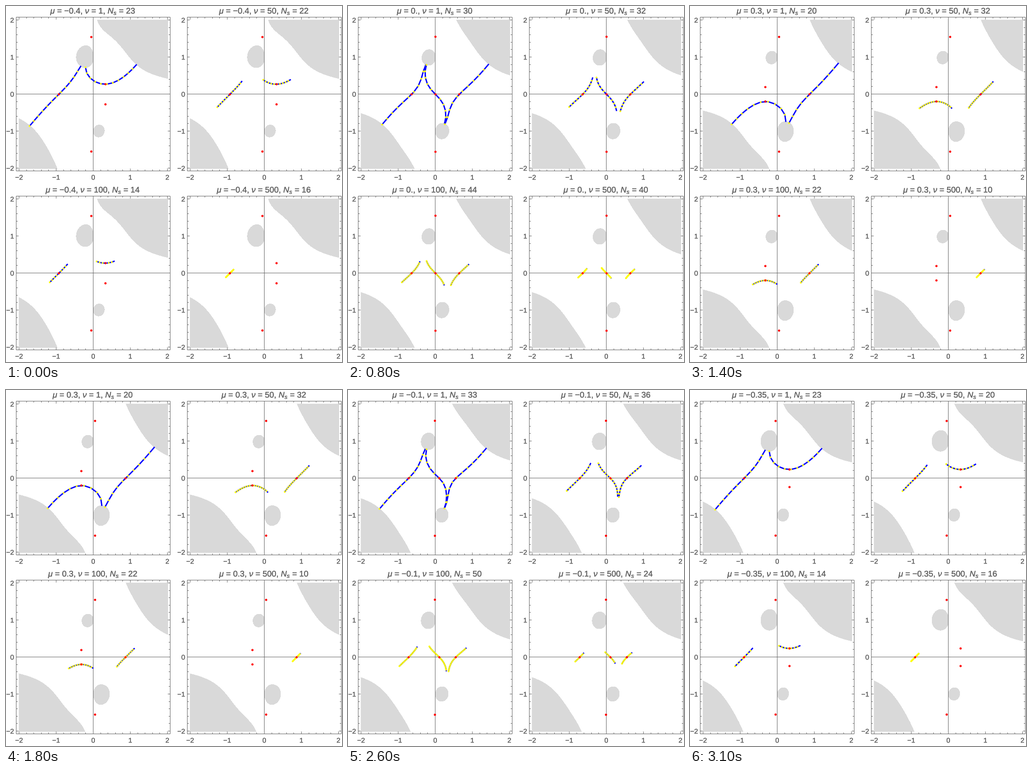
A matplotlib script that plays this animation: 707 px wide and 750 px high, repeating every 3200 ms.

```python
import numpy as np
import matplotlib.pyplot as plt
from matplotlib import patheffects
from matplotlib.animation import FuncAnimation
from matplotlib.collections import LineCollection

# Thimbles of the phase (x - mu)^2 + 2 / (1 + x^2) at four frequencies nu.
W, H, DPI = 707, 750, 64
PT = 72 / DPI            # points per pixel
UNIT = 78                # pixels per axis unit
HALF = 162               # half the side of a panel frame
CUT = 1.93               # height above which the plane is shaded
DECAY = 17               # nu * height at which a thimble is cut off
FAINT = 10               # nu * height at which a saddle no longer counts
MERGE = 0.15             # closer saddles share one uncut curve
INK = "#666666"
CENTRES = ((183.5, 185.5), (543.5, 185.5), (183.5, 562.5), (543.5, 562.5))

# Number of segments for |mu| = 0, 0.05, ... 0.4
COUNTS = {
    1: (30, 32, 33, 28, 22, 21, 20, 23, 23),
    50: (32, 34, 36, 30, 24, 28, 32, 20, 22),
    100: (44, 47, 50, 34, 18, 20, 22, 14, 14),
    500: (40, 32, 24, 31, 38, 24, 10, 16, 16),
}

plt.rcParams.update({
    "font.family": "Liberation Sans",
    "mathtext.fontset": "custom",
    "mathtext.rm": "Liberation Sans",
    "mathtext.it": "Liberation Sans:italic",
})


def height(z, mu):
    return ((z - mu) ** 2 + 2 / (1 + z * z)).imag


def slope(z, mu):
    return 2 * (z - mu) - 4 * z / (1 + z * z) ** 2


def curvature(z):
    return 2 - 4 * (1 - 3 * z * z) / (1 + z * z) ** 3


def saddles(mu):
    return np.roots([1, -mu, 2, -2 * mu, -1, -mu])


def climb(z, mu):
    d = 1j * np.conj(slope(z, mu))
    return d / abs(d)


def branch(z0, mu, side, limit):
    """Steepest ascent from a saddle up to a height, one pixel per step."""
    d = np.exp(0.5j * (np.pi / 2 - np.angle(curvature(z0))))
    d *= side * np.sign(d.real)
    step = 1 / UNIT
    path = [z0, z0 + d * step]
    while height(path[-1], mu) < limit and len(path) < 150:
        z = path[-1]
        mid = z + climb(z, mu) * step / 2
        path.append(z + climb(mid, mu) * step)
    return path


def resample(path, n):
    arc = np.append(0, np.cumsum(abs(np.diff(path))))
    s = np.linspace(0, arc[-1], n + 1)
    return np.interp(s, arc, path.real) + 1j * np.interp(s, arc, path.imag)


def contours(mu, nu, total):
    """Segmented curves of one panel, from left to right."""
    limit = min(CUT, DECAY / nu)
    found = [z for z in saddles(mu)
             if abs(z.imag) < 1 and -1e-6 < height(z, mu) * nu < FAINT]
    found.sort(key=lambda z: z.real)
    chains = []
    for i, z in enumerate(found):
        after = i > 0 and abs(z - found[i - 1]) < MERGE
        before = i + 1 < len(found) and abs(found[i + 1] - z) < MERGE
        if after:
            chains[-1].append(z)
        else:
            chains.append(branch(z, mu, -1, limit)[::-1])
        if not before:
            chains[-1] += branch(z, mu, 1, limit)[1:]

    chains = [np.array(c) for c in chains]
    lengths = np.cumsum([abs(np.diff(c)).sum() for c in chains])
    marks = np.round(lengths / lengths[-1] * total).astype(int)
    return [resample(c, n) for c, n in zip(chains, np.diff(marks, prepend=0))]


fig = plt.figure(figsize=(W / DPI, H / DPI), dpi=DPI, facecolor="white")
ax = fig.add_axes([0, 0, 1, 1])
ax.set_xlim(0, W)
ax.set_ylim(H, 0)
ax.axis("off")


def label(x, y, text, size, align="center"):
    heavier = [patheffects.withStroke(linewidth=0.35 * PT, foreground=INK)]
    return ax.text(x, y, text, size=size * PT, color=INK, ha=align,
                   va="baseline", path_effects=heavier)


def signed(text):
    return text.replace("-", "\u2212")


def draw_frame(cx, cy):
    lines = [[(cx - HALF, cy), (cx + HALF, cy)], [(cx, cy - HALF), (cx, cy + HALF)]]
    for e in (-1, 1):
        lines.append([(cx - HALF, cy + e * HALF), (cx + HALF, cy + e * HALF)])
        lines.append([(cx + e * HALF, cy - HALF), (cx + e * HALF, cy + HALF)])
        for i in range(-10, 11):
            p, edge = round(i * UNIT / 5), e * HALF
            inner = edge - e * (5 if i % 5 == 0 else 3)
            lines.append([(cx + p, cy + edge), (cx + p, cy + inner)])
            lines.append([(cx + edge, cy + p), (cx + inner, cy + p)])
    ax.add_collection(LineCollection(lines, colors=INK, linewidths=PT,
                                     snap=False, zorder=2))
    for i in range(-2, 3):
        text = signed(str(i))
        label(cx + i * UNIT, cy + HALF + 18.5, text, 14.5)
        label(cx - HALF - 4.5, cy - i * UNIT + 5.5, text, 14.5, "right")


for centre in CENTRES:
    draw_frame(*centre)

titles = [label(cx - 0.5, cy - 169.5, "", 17.3) for cx, cy in CENTRES]
grid = np.linspace(-2.01, 2.01, 400)
plane = grid[None, :] + 1j * grid[:, None]
live = []


def to_px(z, centre):
    return centre[0] + 0.5 + UNIT * z.real, centre[1] + 0.5 - UNIT * z.imag


def dots(x, y, color, size, order):
    """Round dots at sub-pixel places."""
    stubs = [[(a - 0.01, b), (a + 0.01, b)] for a, b in zip(x, y)]
    live.append(ax.add_collection(LineCollection(
        stubs, colors=color, linewidths=size * PT, capstyle="round",
        snap=False, zorder=order)))


def draw(i):
    while live:
        live.pop().remove()
    step = 8 - abs(i - 16)
    mu = step / 20
    name = signed(f"{mu:g}") if mu else "0."
    field = np.clip(height(plane, mu), -8, 8)
    for nu, centre, title in zip(COUNTS, CENTRES, titles):
        total = COUNTS[nu][abs(step)]
        x, y = to_px(plane, centre)
        live.append(ax.contourf(x, y, field, levels=[CUT, 100],
                                colors=["#d9d9d9"], zorder=1))
        for curve in contours(mu, nu, total):
            x, y = to_px(curve, centre)
            live.extend(ax.plot(x, y, color="#0000ff", lw=2.8 * PT, zorder=3,
                                solid_capstyle="butt", solid_joinstyle="round"))
            dots(x[:-1], y[:-1], "#ffff00", 4, 4)
        dots(*to_px(saddles(mu), centre), "#ff0000", 4.8, 5)
        title.set_text(rf"$\mu$ = {name}, $\nu$ = {nu}, $N_s$ = {total}")
    return live + titles


anim = FuncAnimation(fig, draw, frames=32, interval=100, init_func=lambda: titles,
                     repeat=True, repeat_delay=0, blit=False)
plt.show()
```
